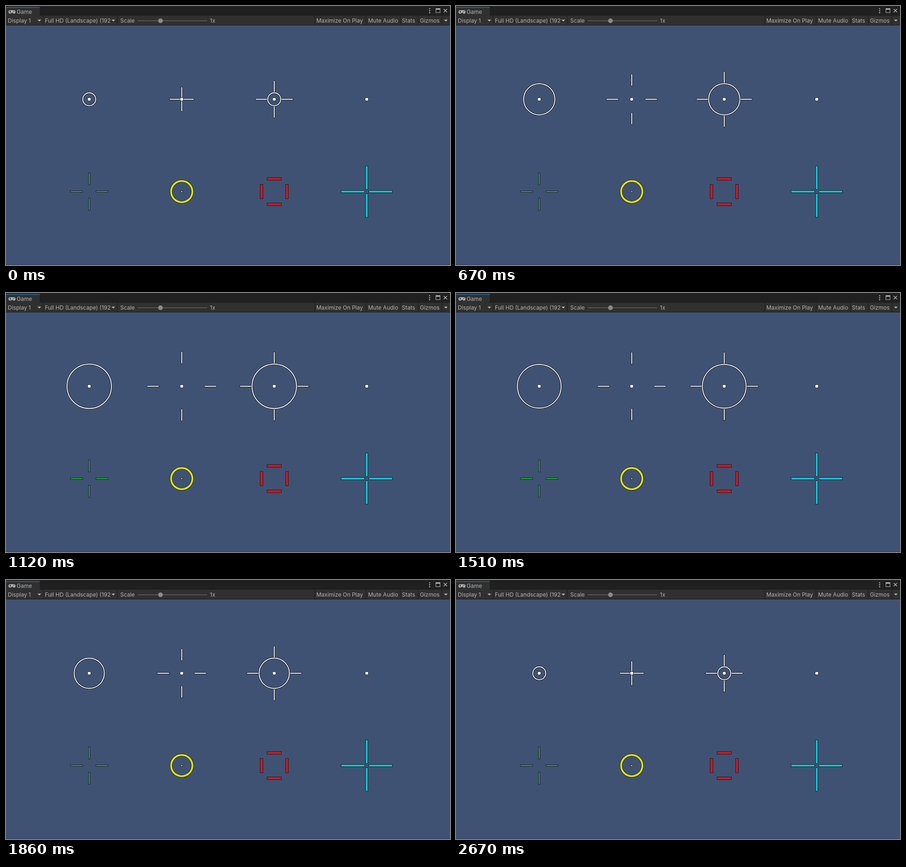
An HTML page for the animation above (2690 ms loop, 960x561 px).

```html
<!DOCTYPE html>
<html lang="en">
<head>
<meta charset="utf-8">
<title>Crosshairs</title>
<style>
  html, body { margin: 0; width: 100%; height: 100%; overflow: hidden; background: #405273; }
  svg { display: block; width: 960px; height: 561px; }
  text { font: 12px Inter, sans-serif; fill: #b4b4b4; }
  .edge { fill: #10141c; fill-opacity: .85; }
  .rim { fill: none; stroke: #10141c; stroke-opacity: .85; }
  .sep { fill: #191919; }
  .icon { fill: #b4b4b4; }
</style>
</head>
<body>
<svg viewBox="0 0 960 561">
  <rect width="960" height="561" fill="#405273"/>
  <rect y="560" width="960" height="1" fill="#303d56"/>

  <rect width="960" height="21" fill="#202020"/>
  <rect y="2" width="73" height="19" fill="#303030"/>
  <rect y="2" width="73" height="2" fill="#2c5d87"/>
  <rect y="21" width="960" height="20" fill="#303030"/>
  <rect class="sep" y="41" width="960" height="1"/>
  <g id="seps"></g>

  <g class="icon">
    <path d="M9 9.2H17A3.6 3.6 0 0 1 17 16.4Q15.600 16.400 14.500 15H11.500Q10.400 16.400 9 16.400A3.600 3.600 0 0 1 9 9.200Z"/>
    <path d="M7.300 12.500h4M9.300 10.500v4" stroke="#303030" stroke-width="1.200"/>
    <circle cx="15" cy="13.300" r=".9" fill="#303030"/>
    <circle cx="17.300" cy="11.700" r=".9" fill="#303030"/>
    <path d="M68 29.500h8l-4 4zM228 29.500h8l-4 4zM947 29.500h8l-4 4z"/>
    <circle cx="916" cy="6" r="1.300"/><circle cx="916" cy="10.300" r="1.300"/><circle cx="916" cy="14.600" r="1.300"/>
    <path d="M929 5h10v10h-10zM930 8v6h8v-6z" fill-rule="evenodd"/>
    <path d="M946.500 6.500l7 7M953.500 6.500l-7 7" stroke="#b4b4b4" stroke-width="1.500"/>
  </g>
  <rect x="285" y="31" width="150" height="2" fill="#555"/>
  <circle cx="334" cy="32" r="5" fill="#8c8c8c"/>

  <text x="23" y="17">Game</text>
  <text x="4" y="36">Display 1</text>
  <text x="84" y="36">Full HD (Landscape) (192</text>
  <text x="247" y="36">Scale</text>
  <text x="441" y="36">1x</text>
  <text x="671" y="36">Maximize On Play</text>
  <text x="783" y="36">Mute Audio</text>
  <text x="856" y="36">Stats</text>
  <text x="895" y="36">Gizmos</text>

  <g id="scene"></g>
</svg>
<script>
const scene = document.getElementById('scene');

function add(parent, tag, attrs) {
  const el = document.createElementNS(scene.namespaceURI, tag);
  for (const k in attrs) el.setAttribute(k, attrs[k]);
  return parent.appendChild(el);
}

// Four outlined bars around a centre; returns a setter for their distance.
function cross(x, y, len, thick, color, gap) {
  const arms = [0, 90, 180, 270].map(a => {
    const side = add(scene, 'g', { transform: `translate(${x} ${y}) rotate(${a})` });
    const arm = add(side, 'g', {});
    add(arm, 'rect', { class: 'edge', y: -thick / 2, width: len, height: thick });
    add(arm, 'rect', { x: 1, y: 1 - thick / 2, width: len - 2, height: thick - 2, fill: color });
    return arm;
  });
  const set = d => arms.forEach(a => a.setAttribute('transform', `translate(${d} 0)`));
  set(gap);
  return set;
}

// Outlined circle; returns a setter for its radius.
function ring(x, y, r, width, color) {
  const parts = [
    add(scene, 'circle', { class: 'rim', cx: x, cy: y, r, 'stroke-width': width + 2 }),
    add(scene, 'circle', { cx: x, cy: y, r, fill: 'none', stroke: color, 'stroke-width': width })
  ];
  return v => parts.forEach(p => p.setAttribute('r', v));
}

function dot(x, y, r, color) {
  add(scene, 'circle', { class: 'edge', cx: x, cy: y, r: r + 1 });
  add(scene, 'circle', { cx: x, cy: y, r, fill: color });
}

const seps = document.getElementById('seps');
for (const x of [80, 240, 667, 778, 852, 891, 942])
  add(seps, 'rect', { class: 'sep', x, y: 21, width: 1, height: 20 });

const white = '#f2f2f2';
const ringA = ring(180, 202, 14, 2, white);
const armsB = cross(380, 202, 27, 4, white, 0);
const armsC = cross(580, 202, 27, 4, white, 14);
const ringC = ring(580, 202, 14, 2, white);
for (const x of [180, 380, 580, 780]) dot(x, 202, 3.3, '#fff');

cross(180, 402, 27, 4, '#22b83c', 14);
ring(380, 402, 23, 4, '#dce01c');
dot(380, 402, 1.6, '#dce01c');
cross(580, 402, 7, 32, '#c01c28', 24);
cross(780, 402, 52, 6, '#16bfd0', 4);

// Spread over time [ms, px]; equal neighbours and steps are pauses.
const keys = [
  [0, 0], [100, 0], [100, 1], [440, 17.3], [570, 27], [670, 27], [670, 28.2],
  [880, 37.5], [1120, 48.6], [1220, 48.6], [1220, 49.6], [1270, 50], [1400, 49.8],
  [1510, 47.5], [1620, 43.3], [1740, 37], [1860, 26.7], [2000, 19], [2130, 12.3],
  [2240, 7.2], [2340, 7.2], [2340, 6.1], [2480, 1.5], [2580, 0.3], [2670, 0], [2690, 0]
];

function spread(t) {
  const i = keys.findIndex(k => k[0] > t);
  const [t0, a] = keys[i - 1], [t1, b] = keys[i];
  return a + (b - a) * (t - t0) / (t1 - t0);
}

function frame() {
  const s = spread(performance.now() % 2690);
  const r = 14 + 0.7 * s;
  ringA(r);
  ringC(r);
  armsB(s);
  armsC(r);
  requestAnimationFrame(frame);
}
frame();
</script>
</body>
</html>
```
